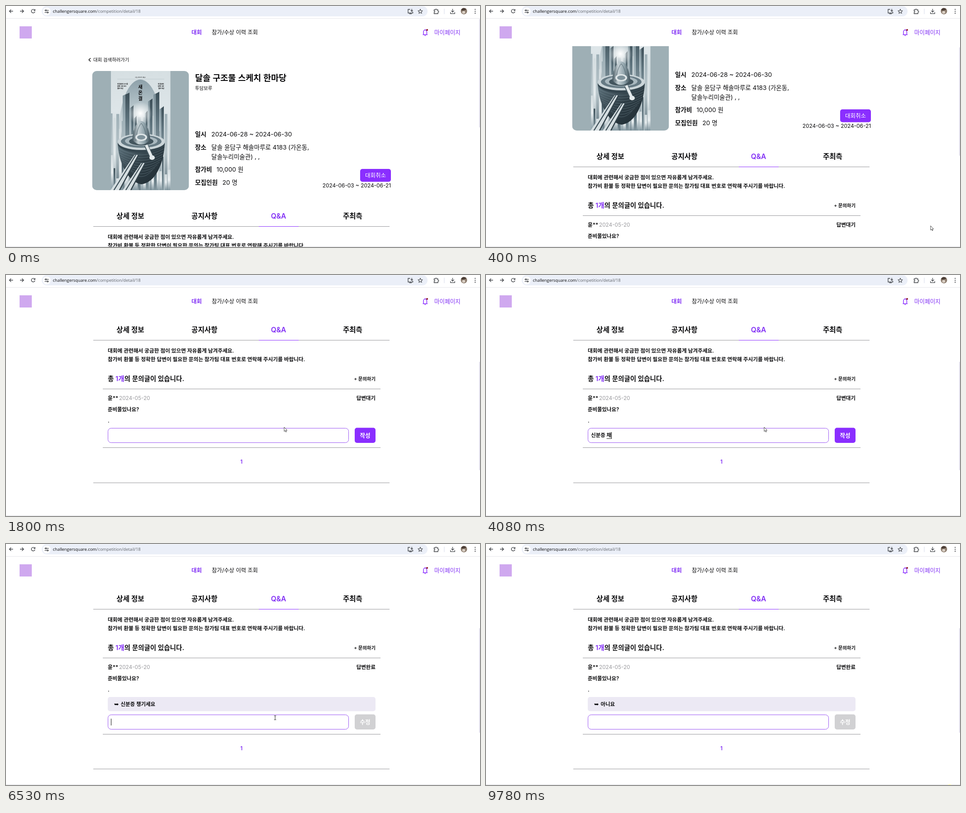
Animation, 1048 px wide and 534 px high, one loop 9.86 s. Source, as an HTML page:

```html
<!DOCTYPE html>
<html lang="ko">
<head>
<meta charset="utf-8">
<title>Q&amp;A</title>
<style>
html, body { margin: 0; width: 100%; height: 100%; overflow: hidden; background: #fff; }
svg { display: block; width: 1048px; height: 534px; }
text { font-family: Inter, "Noto Sans CJK KR", "Noto Sans CJK", sans-serif; fill: #0b0b0d; white-space: pre; }
.b { font-weight: 600; }
.p { fill: #8230f5; }
.w { fill: #fff; }
.g { fill: #9a9a9e; }
.m { text-anchor: middle; }
.e { text-anchor: end; }
.url { font-family: "Open Sans", "Noto Sans", sans-serif; }
.ding { font-family: "DejaVu Sans", sans-serif; }
.ico { fill: none; stroke: #3f4246; stroke-width: 1.3; }
.rule { stroke: #97979b; stroke-width: 1; }
.field { fill: #fff; stroke: #9a55f3; stroke-width: 1; }
.field.idle { stroke: #cdb9ee; }
</style>
</head>
<body>
<svg id="stage" viewBox="0 0 1048 534"></svg>
<script>
const LOOP = 9860, VIEW = 505, PURPLE = '#8a2eff';
const stage = document.getElementById('stage');

// Text placed by the middle of its line
const text = (x, cy, size, str, cls = '', id = '') =>
  `<text x="${x}" y="${(cy + size * .37).toFixed(2)}" font-size="${size}" class="${cls}"${id && ` id="${id}"`}>${str}</text>`;
const rect = (x, y, w, h, fill, r = 0, more = '') =>
  `<rect x="${x}" y="${y}" width="${w}" height="${h}" rx="${r}" fill="${fill}" ${more}/>`;
const rule = (x1, x2, y) => `<path class="rule" d="M${x1} ${y}H${x2}"/>`;
const icon = (d, more = '') => `<path class="ico" d="${d}" ${more}/>`;
const shape = (d, fill) => `<path d="${d}" fill="${fill}"/>`;
const line = (d, color, w) => `<path d="${d}" fill="none" stroke="${color}" stroke-width="${w}"/>`;
const oval = (cx, cy, rx, ry, fill) => `<ellipse cx="${cx}" cy="${cy}" rx="${rx}" ry="${ry}" fill="${fill}"/>`;
const fade = (id, stops, dir = 'x2="0" y2="1"') =>
  `<linearGradient id="${id}" ${dir}>${stops.map((c, i) =>
    `<stop offset="${i / (stops.length - 1)}" stop-color="${c}"/>`).join('')}</linearGradient>`;

function randomizer(seed) {
  return () => (seed = (seed * 16807) % 2147483647) / 2147483647;
}

function poster() {
  const rnd = randomizer(77);
  const row = (count, top, spread, fills) => {
    let s = '';
    for (let i = 0; i < count; i++) {
      const y = top + rnd() * spread;
      s += rect(232 + i * 131 / count, y, 3 + rnd() * 4, 408 - y, fills[i % fills.length]);
    }
    return s;
  };
  let s = rect(190.5, 144, 214, 264, '#9eafb5') + rect(232, 144, 131.5, 264, 'url(#sky)') +
    oval(297, 277, 47, 114, 'url(#arch)') +
    row(22, 238, 55, ['url(#mist)', 'url(#pale)']);
  for (const [x, top, w] of [[258, 192, 15], [274, 220, 8], [283, 243, 6], [307, 232, 6], [314, 205, 10], [326, 190, 13], [340, 222, 9]])
    s += shape(`M${x} ${top + 7}L${x + w} ${top}V312H${x}Z`, 'url(#tower)') +
      shape(`M${x} ${top + 7}L${x + w * .4} ${top + 4}V312H${x}Z`, 'url(#lit)');
  s += '<circle cx="297" cy="238" r="26" fill="url(#glow)"/>' +
    row(22, 320, 62, ['url(#pale)', 'url(#tower)', 'url(#pale)']) +
    shape('M247 304C249 350 272 392 300 395C330 391 349 350 351 304Z', 'url(#bowl)');
  for (let i = 0; i < 9; i++)
    s += line(`M${249 + i * i * .4} ${316 + i * 6}Q299 ${344 + i * 6} ${349 - i * i * .4} ${316 + i * 6}`, '#768a94', .5);
  s += oval(299, 305, 52, 20, '#34454e') + oval(299, 301, 52, 18, '#cbd5d9') +
    oval(299, 300, 45, 14, '#667a84') + oval(299, 299, 36, 11, '#a9b8bf') + oval(299, 300, 27, 9, '#43555e') +
    shape('M279 297C281 271 290 255 299 255C308 255 317 271 319 297Q299 317 279 297Z', 'url(#dome)') +
    line('M287 299C289 277 294 265 299 260C304 265 309 277 311 299', '#52656e', 1) +
    oval(299, 291, 13, 8, '#dfe6e8') + oval(299, 291, 9, 5, '#7f929b') +
    line('M310 309L321 333', '#45575f', 9) + line('M310 308L321 332', '#e3e9eb', 6) +
    oval(323, 336, 6, 5, '#e3e9eb');
  for (const [x, top, w] of [[231, 330, 19], [258, 348, 17]]) {
    const far = x + (408 - top) * .68;
    s += shape(`M${x} 408L${far} ${top}H${far + 8}L${x + w} 408Z`, '#d5dee1') +
      line(`M${x + w * .4} 408L${far + 3} ${top}`, '#394a53', 2.2) +
      line(`M${x + w + 1} 408L${far + 9} ${top}`, '#33434b', 2.5);
  }
  ['새', '온', '결'].forEach((c, i) => s += text(297, 179 + i * 13, 10.5, c, 'b m'));
  s += line('M246 162H350', '#aab7bc', .5) + text(297, 158, 3, 'city sketch days', 'm');
  ['새 물결의 도시를', '함께 그려 보는', '열린 마당'].forEach((c, i) => {
    s += text(246, 173 + i * 5, 3.4, c, 'b') + text(350, 173 + i * 5, 3.4, c.slice(0, 6), 'b e');
  });
  return `<g clip-path="url(#card)">${s}</g>`;
}

function toolbar() {
  return rect(0, 0, 1048, 28, '#fff') + rect(79, .5, 853, 22.5, '#ebeff8', 11.2) +
    rect(0, 27, 1048, 1, '#e6e7ea') +
    icon('M15.5 11.5H7.5M11.3 7.7L7.5 11.5L11.3 15.3') + icon('M31 11.5H39M35.2 7.7L39 11.5L35.2 15.3') +
    icon('M63.2 8.8A4 4 0 1 0 64 12.5M64.2 7V10.2H61') +
    '<circle cx="90" cy="12" r="8.7" fill="#fff"/>' +
    icon('M85.5 9.7H87M90.2 9.7H94.5M85.5 14.3H89.8M93 14.3H94.5') +
    '<circle class="ico" cx="88.2" cy="9.7" r="1.4"/><circle class="ico" cx="92" cy="14.3" r="1.4"/>' +
    `<text class="url" x="103.5" y="15.4" font-size="9.35">challengersquare.com<tspan fill="#60646a">/competition/detail/18</tspan></text>` +
    icon('M893.5 7.5H889V15.5H899.5V13M891.5 17.3H897M897.2 6.5V11.5M894.8 9.6L897.2 12L899.6 9.6') +
    icon('M916 7L917.4 10.3L921 10.6L918.3 12.9L919.1 16.4L916 14.5L912.9 16.4L913.7 12.9L911 10.6L914.6 10.3Z', 'stroke-linejoin="round" style="stroke-width:1.1"') +
    icon('M946.5 8.5H949.3Q949.3 6.6 950.8 6.6T952.3 8.5H955V11.3Q956.8 11.3 956.8 12.8T955 14.3V17H946.5V14.2Q948.3 14.2 948.3 12.8T946.5 11.3Z') +
    rect(968.5, 6, 1, 12, '#d6dcea') +
    icon('M987.5 6.5V13.3M984.3 10.4L987.5 13.6L990.7 10.4M982.8 13.8V16.8H992.2V13.8') +
    '<circle cx="1012.5" cy="11.5" r="7" fill="#8a7a6c"/>' + shape('M1006 9A7 7 0 0 1 1018 7Q1012 12 1006 9Z', '#4b3d35') +
    oval(1012, 14, 3.5, 3, '#d9cfc4') +
    [7.6, 11.8, 16].map(y => `<circle cx="1037.3" cy="${y}" r="1.15" fill="#3f4246"/>`).join('');
}

function header() {
  return rect(0, 28, 1046, 61, '#fff') + rect(30, 45, 27, 27, '#cfa8ef') +
    text(410, 58.5, 12.4, '대회', 'b p') + text(455, 58.5, 12.3, '참가/수상 이력 조회') +
    line('M921.5 63.5H932M923 63.5V57.5A3.7 4.2 0 0 1 930.4 57.5V63.5M926.7 53V51.5M925.4 65.6H928', PURPLE, 1.5) +
    '<circle cx="931" cy="53" r="2.1" fill="#8f1d2c"/>' +
    text(947, 58.5, 12.6, '마이페이지', 'p');
}

function info() {
  const rows = [[284, '일시', 454, '2024-06-28 ~ 2024-06-30', 13.75], [312.5, '장소', 454, '달솔 윤담구 해솔마루로 4183 (가온동,', 13.5],
    [334, '', 454, '달솔누리미술관) , ,', 13.5], [362, '참가비', 465.5, '10,000 원', 13.6], [390.5, '모집인원', 478.5, '20 명', 13.6]];
  return line('M187 115.5L183.2 119.2L187 123', '#111', 1.5) +
    text(193, 119, 10.4, '대회 검색하러가기') + poster() +
    text(418, 159, 18.6, '달솔 구조물 스케치 한마당', 'b') + text(418, 182, 10.3, '투담보루') +
    rows.map(([y, k, x, v, size]) => text(418, y, 13.6, k, 'b') + text(x, y, size, v)).join('') +
    rect(783, 361, 68, 28.5, PURPLE, 5) + text(817, 375, 12.5, '대회취소', 'w m') +
    text(851, 398, 11.87, '2024-06-03 ~ 2024-06-21', 'e');
}

function board() {
  return ['상세 정보', '공지사항', 'Q&amp;A', '주최측'].map((s, i) =>
      text(275 + i * 163.8, 465, 15.6, s, i == 2 ? 'b m p' : 'b m')).join('') +
    rule(193, 848, 488.5) + rect(559, 488, 88, 1, PURPLE) +
    text(225, 511.5, 11.68, '대회에 관련해서 궁금한 점이 있으면 자유롭게 남겨주세요.', 'b') +
    text(225, 530.5, 11.68, '참가비 환불 등 정확한 답변이 필요한 문의는 참가팀 대표 번호로 연락해 주시기를 바랍니다.', 'b') +
    text(225, 573.5, 14.55, '총 <tspan class="p">1개</tspan>의 문의글이 있습니다.', 'b') +
    text(817, 574, 10.4, '+ 문의하기', 'b e') + rule(214, 828, 596.5) +
    text(225, 617, 11.6, '윤**', 'b') + text(250, 617, 11.75, '2024-05-20', 'g') +
    text(817, 617, 11.5, '', 'b e', 'status') +
    text(225, 642, 11.4, '준비물있나요?', 'b') + text(225, 667, 11.5, '.', 'b') +
    `<g id="reply">${rect(225, 683, 592, 31.5, '#ece9f4', 5)}` +
    text(239, 698.5, 12.5, '➥', 'ding') + text(253.5, 699, 11.45, '', 'b', 'answer') + '</g>' +
    '<g id="form">' + rect(225.5, 683.5, 532, 32, '#fff', 7, 'class="field" id="field"') +
    rect(771, 682.5, 46, 33.5, PURPLE, 5, 'id="button"') + text(794, 699, 12.6, '', 'b w m', 'label') +
    text(232.3, 699, 11.4, '', 'b', 'typed') +
    rect(0, 706, 10, 1, '#222', 0, 'id="under"') + rect(0, 692, 1, 15, '#111', 0, 'id="caret"') +
    rule(214, 828, 726.5) + text(520.5, 758, 12, '1', 'b p m') + '</g>' +
    '<path class="rule" id="end" d="M193 804.5H848"/>';
}

stage.innerHTML = '<defs>' +
  '<clipPath id="card"><rect x="190.5" y="144" width="214" height="264" rx="10"/></clipPath>' +
  fade('sky', ['#d6dfe2', '#dde5e8', '#c9d4d8', '#a9b8be']) + fade('arch', ['#8ea1aa', '#b3c2c8', '#d3dcdf', '#465860', '#26343b']) +
  fade('pale', ['#d3dcdf', '#e6ecee', '#8397a0']) + fade('mist', ['#9fb0b7', '#b9c6cb', '#60757f']) +
  fade('tower', ['#3c4e57', '#5d727c', '#84979f']) + fade('lit', ['#7d919a', '#9fb0b7', '#b4c2c8']) +
  fade('bowl', ['#5f747e', '#2e3d45', '#1e2a31'], 'x2="1" y2="1"') +
  fade('dome', ['#42545d', '#c6d1d5', '#8fa2aa', '#3e5059'], 'x2="1" y2="0"') +
  '<radialGradient id="glow"><stop stop-color="#fff"/><stop offset="1" stop-color="#fff" stop-opacity="0"/></radialGradient></defs>' +
  rect(0, 0, 1048, 534, '#fff') + `<g id="page">${info()}${board()}</g>` + header() + toolbar() +
  rect(1046, 29, 2, 240, '#e4e1ee', 0, 'id="thumb"') + rect(0, 533, 1048, 1, '#dedee2') +
  '<ellipse id="speck" cx="1025" cy="534" rx="4" ry="1.6" fill="#fbf6a0"/>' +
  '<path id="arrow" d="M0 0V9.6L2.2 7.6L3.7 11L5.2 10.3L3.7 7.1H6.6Z" fill="#fff" stroke="#222" stroke-width=".8"/>' +
  '<path id="beam" d="M-2.2 -4.5H-.6L0 -4L.6 -4.5H2.2M0 -4V4M-2.2 4.5H-.6L0 4L.6 4.5H2.2" fill="none" stroke="#222" stroke-width="1"/>';

const el = {};
stage.querySelectorAll('[id]').forEach(n => el[n.id] = n);

const SCROLL = [[0, 0], [190, 12], [260, 44], [330, 88], [400, 132], [470, 240], [540, 344]];
const CARET = [[0, 0], [1340, 1], [1800, 0], [2330, 1], [5470, 0], [6000, 1], [8710, 0], [9240, 1], [9770, 0]];
const id = '신분증 ';
const TYPED = [[0, ''], [2330, 'ㅅ'], [2460, '시'], [2530, '신'], [2730, '신ㅂ'], [2920, '신부'], [2990, '신분'],
  [3140, '신붅'], [3210, '신분즈'], [3410, '신분증'], [3800, id], [3940, id + 'ㅊ'], [4080, id + '채'],
  [4200, id + '챙'], [4280, id + '챙ㄱ'], [4350, id + '챙기'], [4480, id + '챙깃'], [4550, id + '챙기세'],
  [4670, id + '챙기셍'], [4810, id + '챙기세요'], [4940, ''], [6920, 'ㅇ'], [7060, '아'], [7590, '안'],
  [7720, '아니'], [7790, '아닝'], [7920, '아니요'], [8180, '']];
const MOUSE = [[0, 1000, 545], [190, 1000, 540], [330, 989, 497], [400, 983, 487], [540, 977, 482], [800, 946, 468],
  [1130, 797, 408], [1340, 615, 337], [5669, 615, 337], [5670, 621, 337], [6000, 621, 337], [6530, 595, 385],
  [8710, 595, 385], [9520, 1024, 524], [9710, 1024, 545]];

const held = (table, t) => table.findLast(k => k[0] <= t)[1];

function glide(table, t) {
  const i = table.findLastIndex(k => k[0] <= t), a = table[i], b = table[i + 1] || a;
  const u = b === a ? 0 : (t - a[0]) / (b[0] - a[0]);
  return [a[1] + (b[1] - a[1]) * u, a[2] + (b[2] - a[2]) * u];
}

const put = (n, attr, v) => n.setAttribute(attr, v);
const show = (n, on) => put(n, 'visibility', on ? 'visible' : 'hidden');
function say(n, s) { if (n.textContent !== s) n.textContent = s; }

function draw(t) {
  const sent = t >= 4940, editing = t >= 6920 && t < 8180;
  const scroll = held(SCROLL, t), height = sent ? 1102 : 1063;
  put(el.page, 'transform', `translate(0 ${-scroll})`);
  put(el.thumb, 'y', 29 + scroll * VIEW / height);
  put(el.thumb, 'height', VIEW * VIEW / height);

  say(el.status, sent ? '답변완료' : '답변대기');
  say(el.answer, t < 8180 ? '신분증 챙기세요' : '아니요');
  show(el.reply, sent);
  put(el.form, 'transform', `translate(0 ${sent ? 39 : 0})`);
  put(el.end, 'transform', `translate(0 ${sent ? 38 : 0})`);
  put(el.field, 'class', t < 1340 ? 'field idle' : 'field');
  put(el.button, 'fill', !sent || editing ? PURPLE : '#d1d1d3');
  say(el.label, sent ? '수정' : '작성');

  const str = held(TYPED, t), n = str.length;
  say(el.typed, str);
  const width = n ? el.typed.getComputedTextLength() : 0;
  const before = n > 1 ? el.typed.getSubStringLength(0, n - 1) : 0;
  show(el.under, n && !str.endsWith(' '));
  put(el.under, 'x', 232.3 + before);
  put(el.under, 'width', width - before);
  show(el.caret, held(CARET, t));
  put(el.caret, 'x', Math.round(232 + width));

  const [x, y] = glide(MOUSE, t);
  const overField = sent && x > 225 && x < 757 && y > 378 && y < 411;
  show(el.arrow, !overField);
  show(el.beam, overField);
  put(overField ? el.beam : el.arrow, 'transform', `translate(${x} ${y})`);
  show(el.speck, t >= 9520);
}

const start = performance.now();
function tick() {
  draw((performance.now() - start) % LOOP);
  requestAnimationFrame(tick);
}
tick();
</script>
</body>
</html>
```
